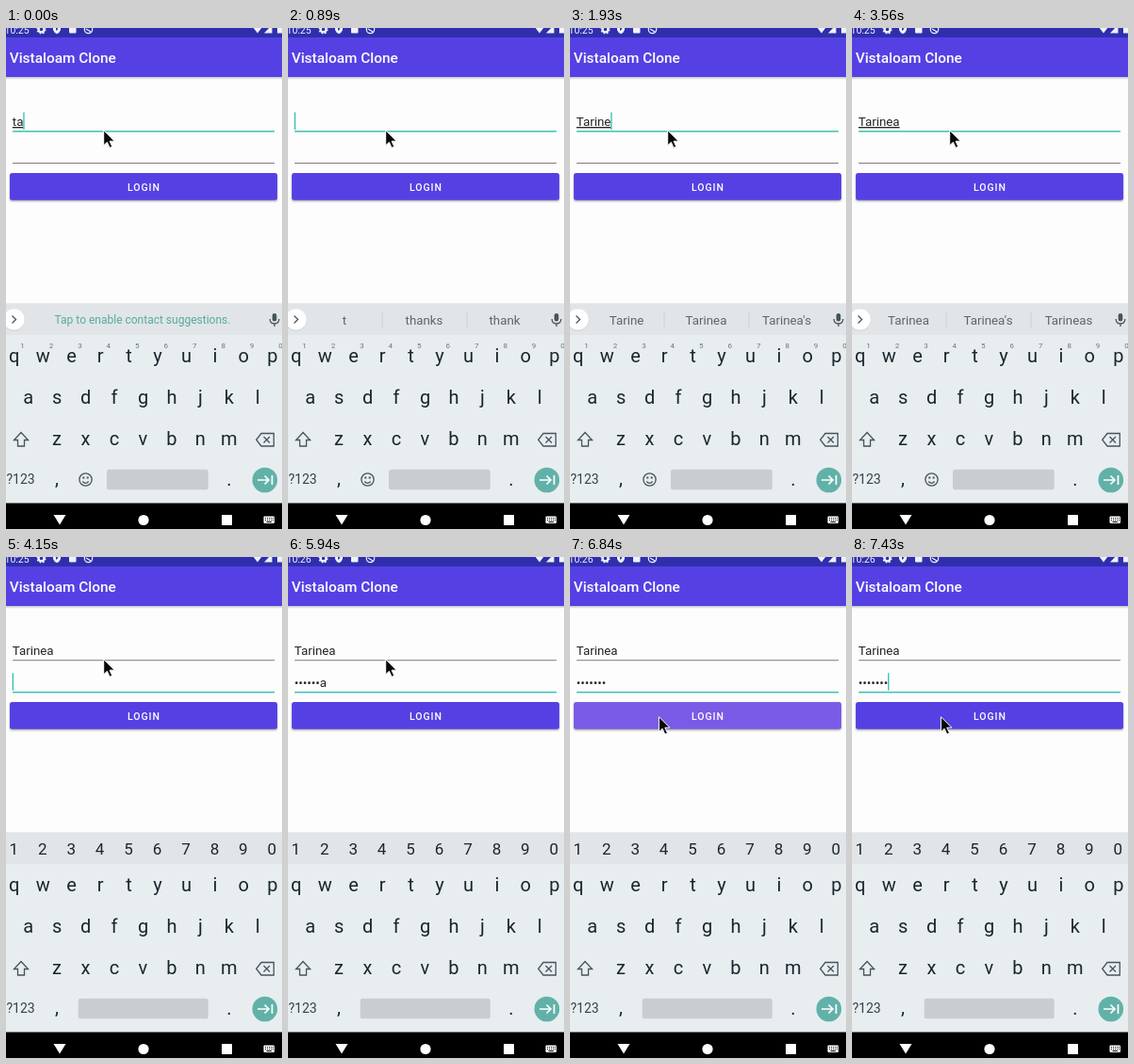
Animation, 293 px wide and 532 px high, one loop 8000 ms. Source, as an HTML page:

```html
<!DOCTYPE html>
<html lang="en">
<head>
<meta charset="utf-8">
<title>Login form</title>
<style>
  html, body { margin: 0; width: 100%; height: 100%; overflow: hidden; background: #fdfdfd; }
  svg { display: block; width: 100vw; height: 100vh; font-family: Roboto, sans-serif; }
  text { white-space: pre; }
  .mid { text-anchor: middle; }
  .field { font-size: 13.3px; fill: #242424; }
  .composing { text-decoration: underline; text-decoration-thickness: 1px; }
  .key { font-size: 20px; fill: #18272e; }
  .digit { font-size: 17px; fill: #18272e; }
  .hint { font-size: 8px; fill: #6b767b; }
  .word { font-size: 13.3px; fill: #59666c; }
  .line { fill: none; stroke: #46545b; stroke-width: 1.3; }
</style>
</head>
<body>
<svg viewBox="0 0 293 532" preserveAspectRatio="none">
  <defs>
    <linearGradient id="shade" x2="0" y2="1">
      <stop stop-color="#000" stop-opacity=".22"/>
      <stop offset="1" stop-color="#000" stop-opacity="0"/>
    </linearGradient>
    <filter id="soft" x="-5%" y="-30%" width="110%" height="170%"><feGaussianBlur stdDeviation="1.2"/></filter>
  </defs>
  <rect width="293" height="532" fill="#fdfdfd"/>

  <!-- status and app bar -->
  <rect y="52" width="293" height="3" fill="url(#shade)"/>
  <rect width="293" height="52" fill="#5541e3"/>
  <rect width="293" height="10" fill="#2f2fad"/>
  <g fill="#f1f1fb">
    <text id="clock" x="-1.5" y="5.8" font-size="10.5"></text>
    <circle cx="37.5" cy="1.5" r="2.9" fill="none" stroke="#f1f1fb" stroke-width="2.2"/>
    <circle cx="37.5" cy="1.5" r="4.3" fill="none" stroke="#f1f1fb" stroke-width="1.4" stroke-dasharray="1.7"/>
    <path d="M50-3h8v5q-1 3-4 4.200q-3-1.200-4-4.200z"/>
    <path d="M53-1v4l2.500-2z" fill="#2f2fad"/>
    <rect x="67" y="-2" width="7.500" height="7.500" rx="1"/>
    <circle cx="87.500" cy="1.500" r="4.200" fill="none" stroke="#f1f1fb" stroke-width="1.200"/>
    <path d="M85 1l5 3" stroke="#f1f1fb" stroke-width="1.400"/>
    <path d="M262-1h10l-5 6.500zM274 5.500h8.500v-9zM288-3h5v8.500h-5z"/>
  </g>
  <text x="3.7" y="37.300" font-size="15.400" font-weight="500" fill="#fff">Vistaloam Clone</text>

  <!-- form -->
  <rect id="nameLine" x="7" width="278"/>
  <rect id="passLine" x="7" width="278"/>
  <text id="name" class="field" x="6.800" y="104"></text>
  <text id="pass" class="field" x="6.800" y="137.500"></text>
  <rect id="caret" width="1.300" height="18.500" fill="#35bda9"/>
  <rect x="4" y="155.500" width="284" height="28.500" rx="2" fill="#000" opacity=".35" filter="url(#soft)"/>
  <rect id="button" x="4" y="154" width="284" height="28.700" rx="2.500"/>
  <text x="146.400" y="172.500" class="mid" font-size="10.500" font-weight="500" letter-spacing=".94" fill="#fff">LOGIN</text>

  <!-- keyboard -->
  <rect y="292.500" width="293" height="212" fill="#e8edf0"/>
  <rect y="292.500" width="293" height="33.500" fill="#e1e5e8"/>
  <g id="letters"></g>
  <g id="digits"></g>
  <g id="plain">
    <g id="hints"></g>
    <circle cx="8.500" cy="310" r="11.500" fill="#000" opacity=".1"/>
    <circle cx="8.500" cy="309.500" r="11.200" fill="#fff"/>
    <path class="line" d="M6.500 305.500l4 4-4 4"/>
    <rect x="282.700" y="303" width="4.600" height="8.500" rx="2.300" fill="#46545b"/>
    <path class="line" d="M280.200 309q0 5 4.800 5t4.800-5M285 314v3"/>
    <circle class="line" cx="84.500" cy="479.500" r="6.600"/>
    <path class="line" d="M81.300 481.500q3.200 3.600 6.400 0"/>
    <path d="M81.300 476.500h2v2h-2zM85.700 476.500h2v2h-2z" fill="#46545b"/>
  </g>
  <text id="offer" class="mid" x="145" y="314.300" font-size="12" fill="#56ab9f">Tap to enable contact suggestions.</text>
  <g id="words">
    <path d="M100 301v17M190 301v17" stroke="#cbd0d3"/>
    <text class="word mid" x="60" y="314.500"></text>
    <text class="word mid" x="144.500" y="314.500"></text>
    <text class="word mid" x="230" y="314.500"></text>
  </g>
  <path class="line" d="M16 429.500l-7.500 8h4v6.500h7v-6.500h4z"/>
  <path class="line" d="M271 430.500h13.300v13.500H271l-5.300-6.750zM273.500 434l6.500 6.500m0-6.500l-6.500 6.500"/>
  <text x=".5" y="484.300" font-size="14" fill="#33424a">?123</text>
  <text class="key mid" x="54" y="485">,</text>
  <text class="key mid" x="237" y="486">.</text>
  <rect id="space" y="468.800" height="21.500" rx="2.500" fill="#c9cdd0"/>
  <circle cx="274.800" cy="480" r="13.300" fill="#62b1a8"/>
  <path d="M267 480h12m-4.500-4.500l4.500 4.500-4.500 4.500M282.500 475v10" fill="none" stroke="#fff" stroke-width="1.700"/>

  <!-- navigation -->
  <rect y="504.500" width="293" height="28" fill="#000"/>
  <g fill="#fff">
    <path d="M50.500 517h13l-6.500 10.500z"/>
    <circle cx="146" cy="522.500" r="5.600"/>
    <rect x="229" y="517" width="11" height="11" rx=".7"/>
    <rect x="273.500" y="518.500" width="11.500" height="7.500" rx="1"/>
    <path d="M275 520.500h9M275 522.500h9" stroke="#000" stroke-dasharray="1"/>
    <path d="M276.500 524.500h5.500" stroke="#000"/>
  </g>

  <path id="mouse" d="M0 0v16l3.700-3.400 2.700 6 2.700-1.200-2.700-5.900h5.100z" fill="#080808" stroke="#fff" stroke-width="1" stroke-linejoin="round"/>
</svg>
<script>
const LOOP = 8000;
const $ = id => document.getElementById(id);
const TEAL = "#3fc1b1", GRAY = "#7d7d7d";

function addText(parent, className, x, y, value) {
  const node = document.createElementNS("http://www.w3.org/2000/svg", "text");
  node.setAttribute("class", className + " mid");
  node.setAttribute("x", x);
  node.setAttribute("y", y);
  node.textContent = value;
  parent.append(node);
}

const PITCH = 30.45;
[["qwertyuiop", 8.7, 355], ["asdfghjkl", 23.7, 398.500], ["zxcvbnm", 54, 443]].forEach(([row, x, y]) =>
  [...row].forEach((letter, i) => addText($("letters"), "key", x + i * PITCH, y, letter)));
[..."1234567890"].forEach((digit, i) => {
  addText($("hints"), "hint", 17.500 + i * PITCH, 339.500, digit);
  addText($("digits"), "digit", 8.300 + i * PITCH, 316, digit);
});

const OFFER = "offer";
const guesses = stem => [stem, "Tarinea", "Tarinea's"];

// Each step changes only the listed parts of the state.
const steps = [
  [0, { clock: "10:25", name: "ta", pass: "", field: "name", composing: true, caret: true,
        strip: OFFER, secret: false, pressed: false, mouse: 0 }],
  [300, { name: "tar" }],
  [600, { name: "ta" }],
  [740, { name: "t", strip: ["t", "thanks", "thank"] }],
  [890, { name: "" }],
  [1040, { strip: OFFER }],
  [1190, { name: "T", strip: ["T", "Thanks", "The"] }],
  [1340, { name: "Ta", strip: ["Ta", "Take", "Talk"] }],
  [1480, { name: "Tar", strip: ["Tar", "Target", "Tart"] }],
  [1630, { name: "Tari", strip: guesses("Tari") }],
  [1780, { name: "Tarin", strip: guesses("Tarin") }],
  [1930, { name: "Tarine", strip: guesses("Tarine") }],
  [2070, { name: "Tarinea", strip: ["Tarinea", "Tarinea's", "Tarineas"] }],
  [2520, { caret: false }],
  [2970, { caret: true }],
  [3560, { caret: false }],
  [3860, { field: "pass", composing: false, caret: true, strip: null }],
  [4150, { secret: true }],
  [4300, { clock: "10:26" }],
  [4600, { pass: "a" }],
  [4890, { pass: "•r" }],
  [5040, { pass: "•••i" }],
  [5190, { pass: "•••••e" }],
  [5340, { pass: "••••••a" }],
  [5940, { caret: false }],
  [6090, { mouse: .1 }],
  [6240, { mouse: .4 }],
  [6380, { mouse: .75, caret: true }],
  [6530, { mouse: .95 }],
  [6680, { mouse: 1 }],
  [6840, { pass: "•••••••", caret: false, pressed: true }],
  [6980, { pressed: false }],
  [7430, { caret: true }]
];

const show = (node, visible) => { node.style.display = visible ? "" : "none"; };
const set = (node, attrs) => Object.entries(attrs).forEach(([key, value]) => node.setAttribute(key, value));

function render(state) {
  const onName = state.field === "name";
  for (const id of ["clock", "name", "pass"]) $(id).textContent = state[id];
  $("name").classList.toggle("composing", state.composing);
  set($("nameLine"), { y: onName ? 109 : 109.200, height: onName ? 1.500 : 1, fill: onName ? TEAL : GRAY });
  set($("passLine"), { y: onName ? 143 : 142.900, height: onName ? 1 : 1.500, fill: onName ? GRAY : TEAL });

  const text = $(state.field);
  const width = text.textContent ? text.getComputedTextLength() : 0;
  set($("caret"), { x: 6.700 + width, y: onName ? 89.500 : 123.200 });
  show($("caret"), state.caret);

  show($("plain"), !state.secret);
  show($("digits"), state.secret);
  set($("space"), state.secret ? { x: 76.700, width: 138 } : { x: 107, width: 107.700 });
  const words = Array.isArray(state.strip);
  show($("offer"), state.strip === OFFER);
  show($("words"), words);
  if (words) $("words").querySelectorAll("text").forEach((node, i) => { node.textContent = state.strip[i]; });

  set($("button"), { fill: state.pressed ? "#7a5be7" : "#5541e3" });
  set($("mouse"), { transform: `translate(${103.700 - 9.300 * state.mouse} ${108.700 + 61 * state.mouse})` });
}

let shown = -1;
function tick() {
  const now = performance.now() % LOOP;
  const count = steps.filter(([time]) => time <= now).length;
  if (count !== shown) {
    render(Object.assign({}, ...steps.slice(0, count).map(([, change]) => change)));
    shown = count;
  }
  requestAnimationFrame(tick);
}
tick();
</script>
</body>
</html>
```
